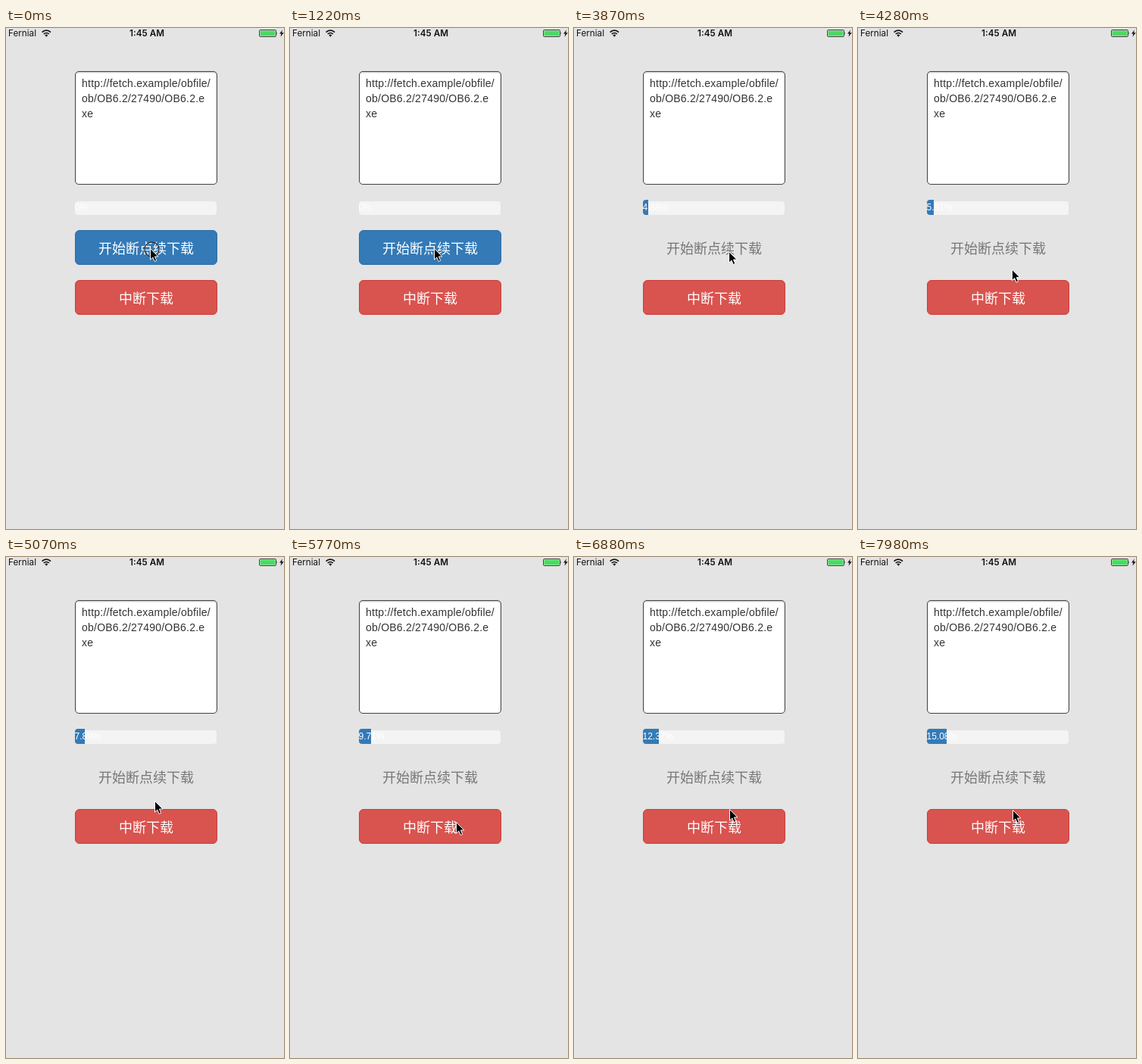
An HTML page for the animation above (8000 ms loop, 367 by 662 pixels).

```html
<!DOCTYPE html>
<html lang="zh">
<head>
<meta charset="utf-8">
<title>断点续下载</title>
<style>
  html, body { margin: 0; width: 100%; height: 100%; overflow: hidden; background: #e4e4e4; }
  #stage { position: relative; width: 367px; height: 662px; overflow: hidden; background: #e4e4e4; font-family: "Liberation Sans", Arial, sans-serif; }
  #stage > * { position: absolute; box-sizing: border-box; }
  .status { top: 0; height: 14px; line-height: 14px; font-family: Inter, sans-serif; font-size: 11.7px; color: #111; white-space: nowrap; }
  .network { left: 3px; }
  .clock { left: 136px; width: 100px; text-align: center; font-weight: 600; }
  .icons, .pointer { left: 0; top: 0; overflow: visible; }
  .link { left: 91px; top: 57px; width: 188px; height: 150px; padding: 5px 0 0 8px; border: 1px solid #444; border-radius: 5px; background: #fff; box-shadow: inset 0 1px 2px rgba(0, 0, 0, .25); font-size: 14px; line-height: 20px; letter-spacing: .23px; color: #333; white-space: nowrap; }
  .track { left: 91px; top: 229px; width: 187px; height: 18px; border-radius: 4px; background: #f4f4f4; }
  .clip { left: 91px; top: 227px; width: 187px; height: 20px; border-radius: 4px; overflow: hidden; }
  #bar { width: 0; height: 100%; background: #337ab7; }
  #label { left: 90.5px; top: 227px; font-size: 12px; line-height: 20px; color: #fff; white-space: nowrap; }
  .btn { left: 91px; width: 188px; height: 46px; border: 1px solid; border-radius: 6px; font: 18px/44px "Noto Sans CJK SC", "Noto Sans CJK", sans-serif; text-align: center; color: #fff; white-space: nowrap; }
  #start { top: 267px; background: #337ab7; border-color: #2e6da4; }
  #start.off { background: none; border-color: transparent; color: #777; }
  .stop { top: 333px; background: #d9534f; border-color: #c9403b; }
</style>
</head>
<body>
<div id="stage">
  <div class="status network">Fernial</div>
  <div class="status clock">1:45 AM</div>
  <svg class="icons" width="367" height="14">
    <g fill="none" stroke="#111" stroke-width="1.7">
      <path d="M47.6 5.6a8 8 0 0 1 11.4 0M49.8 8a5 5 0 0 1 7 0"/>
      <path d="M53.3 11.7l-2-2.2a2.9 2.9 0 0 1 4 0z" fill="#111" stroke="none"/>
    </g>
    <rect x="334.5" y="2.5" width="22" height="9" rx="1.5" fill="none" stroke="#333" stroke-width=".9"/>
    <rect x="335.5" y="3.5" width="20" height="7" rx=".6" fill="#4cd964"/>
    <path d="M357.3 5.2q1.6 1.8 0 3.6z" fill="#333"/>
    <path d="M365 2.5l-4 5h2.4l-1 4.2 4.3-5.4h-2.6z" fill="#111"/>
  </svg>

  <div class="link">http://fetch.example/obfile/<br>ob/OB6.2/27490/OB6.2.e<br>xe</div>

  <div class="track"></div>
  <div class="clip"><div id="bar"></div></div>
  <div id="label">0%</div>

  <div class="btn" id="start">开始断点续下载</div>
  <div class="btn stop">中断下载</div>

  <svg class="pointer" width="367" height="662">
    <g id="tap" fill="none">
      <circle cx="192.5" cy="292.5" r="9.6" stroke="#fff" stroke-opacity=".5" stroke-width="1.8"/>
      <circle cx="192.5" cy="292.5" r="9.6" stroke="#111" stroke-width="1.1"/>
    </g>
    <path id="arrow" d="M0 0V14.6L3.3 11.5 5.7 17 8.2 15.9 5.9 10.5H10.4Z" fill="#000" stroke="#fff" stroke-width="1"/>
  </svg>
</div>
<script>
  const LOOP = 8000;
  const $ = id => document.getElementById(id);
  const bar = $('bar'), label = $('label'), start = $('start'), tap = $('tap'), arrow = $('arrow');

  // Keys are [time, value, ...]
  const percent = [[2600, 0], [2810, .72], [3870, 4.88], [5070, 7.89], [5770, 9.71], [6880, 12.37], [7980, 15.08]];
  const width = [[2809, 0], [2810, 1], [3300, 1], [3870, 7], [5070, 12.5], [5770, 15.5], [6880, 20.5], [7980, 25.5]];
  const path = [
    [3350, 190.5, 291.5], [3870, 204.5, 295.5], [4100, 229, 307], [4340, 195, 323],
    [5070, 196.5, 322.5], [5300, 196, 323], [5770, 219.5, 350.5], [5900, 218, 356],
    [6120, 204, 355], [6500, 204.5, 338], [6880, 205.5, 333.5], [7980, 204.5, 334.5]
  ];

  function sample(keys, t) {
    if (t <= keys[0][0]) return keys[0].slice(1);
    const i = keys.findIndex(k => k[0] > t);
    if (i < 0) return keys[keys.length - 1].slice(1);
    const a = keys[i - 1], b = keys[i], f = (t - a[0]) / (b[0] - a[0]);
    return a.slice(1).map((v, n) => v + (b[n + 1] - v) * f);
  }

  function draw(t) {
    const [p] = sample(percent, t), [w] = sample(width, t), [x, y] = sample(path, t);
    label.textContent = p ? p.toFixed(2) + '%' : '0%';
    bar.style.width = w + 'px';
    start.classList.toggle('off', t >= 1640);
    tap.style.display = t < 60 || (t >= 930 && t < 1220) ? '' : 'none';
    arrow.setAttribute('transform', `translate(${x} ${y})`);
  }

  const origin = performance.now();
  function tick() {
    draw((performance.now() - origin) % LOOP);
    requestAnimationFrame(tick);
  }
  draw(0);
  requestAnimationFrame(tick);
</script>
</body>
</html>
```
